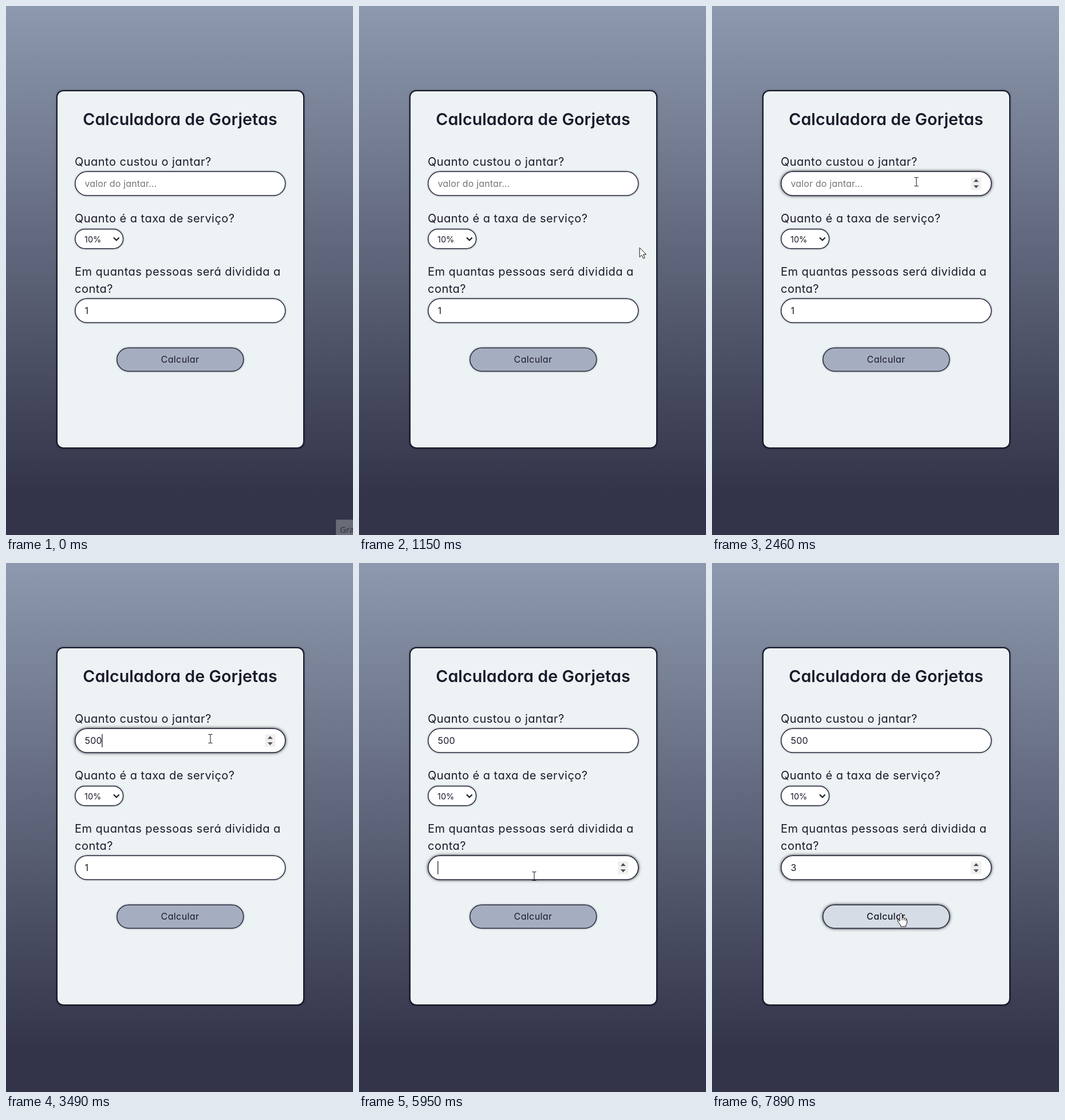
An HTML page for the animation above (8 s loop, 606 by 924 pixels).

```html
<!DOCTYPE html>
<html lang="pt-BR">
<head>
<meta charset="utf-8">
<title>Calculadora de Gorjetas</title>
<style>
  html, body { margin: 0; width: 100%; height: 100%; overflow: hidden; }
  svg {
    display: block; width: 606px; height: 924px;
    background: linear-gradient(#8d99ae, #333449 92%);
    font: 16px Inter, "Open Sans", sans-serif;
    font-feature-settings: "cv11";
    fill: #1a1a2b;
  }
  .title { font-size: 28.6px; font-weight: 600; letter-spacing: .1px; text-anchor: middle; }
  .label { font-size: 20px; letter-spacing: .48px; }
  .box { fill: #fff; stroke: #2b2d42; stroke-width: 1.5; filter: drop-shadow(0 0 1.5px #0006); }
  .glow { fill: #fff; filter: drop-shadow(0 0 3px #000c); }
  .value { letter-spacing: .15px; }
  .caret { stroke: #111; stroke-width: 1.2; }
  .spin rect { fill: #efefef; }
  .spin path { fill: #4d4d4d; }
  .cursor { fill: #fff; stroke: #111; stroke-width: 1; stroke-linejoin: round; }
</style>
</head>
<body>
<svg viewBox="0 0 606 924">
  <rect x="89" y="148" width="431" height="624" rx="11" fill="#edf2f4" stroke="#16182b" stroke-width="2"
        style="filter: drop-shadow(0 0 1.5px #0008)"/>
  <text class="title" x="304" y="208">Calculadora de Gorjetas</text>
  <g class="label">
    <text x="120" y="278.5">Quanto custou o jantar?</text>
    <text x="120" y="378">Quanto é a taxa de serviço?</text>
    <text x="120" y="471">Em quantas pessoas será dividida a</text>
    <text x="120" y="500.5">conta?</text>
  </g>

  <rect class="box" x="120.8" y="389.8" width="83.8" height="34" rx="17"/>
  <text x="137" y="412.5" font-size="14.5">10%</text>
  <path d="M188 404.5l4.8 4.8 4.8-4.8" fill="none" stroke="#1a1a2b" stroke-width="2.2"/>

  <g id="fields"></g>

  <rect class="glow" id="buttonGlow" x="193.8" y="597.3" width="221" height="40.6" rx="20.3"/>
  <rect class="box" id="button" x="193.8" y="597.3" width="221" height="40.6" rx="20.3"/>
  <text id="buttonText" x="304" y="623" text-anchor="middle" letter-spacing=".4">Calcular</text>

  <g id="tooltip">
    <rect x="576.5" y="897.5" width="40" height="40" fill="#696b76" stroke="#5c5e6b"/>
    <text x="583" y="920" font-size="15" font-family="Open Sans, sans-serif" fill="#2e3040">Gra</text>
  </g>

  <g id="cursor" class="cursor">
    <path id="arrow" d="M0 0V16.5L3.8 13 6.4 19 9.2 17.8 6.6 12H11.6Z"/>
    <path id="beam" d="M-3.5-7.5H-1L0-6.8 1-7.5H3.5M0-6.8V6.8M-3.5 7.5H-1L0 6.8 1 7.5H3.5" fill="none"/>
    <path id="hand" d="M-2 1Q-2-1 0-1T2 1V7Q4.5 5.5 5.5 7.5Q8 6.5 8.5 8.5Q10.5 8 10.5 10.5V15Q10.5 18 8.5 20V22H-.5V20L-5.5 13Q-6.5 10.5-4.5 10.5L-2 12.5ZM2 7V11M5.5 8V11M8.5 9V12"/>
  </g>
</svg>
<script>
const LOOP = 8000, BLINK = 530, STEP = 68;
const $ = id => document.getElementById(id);
const show = (el, on) => el.style.display = on ? "" : "none";
const clamp = v => Math.max(0, Math.min(1, v));
const last = (list, t) => list.filter(item => (item[0] ?? item) <= t).pop();

// time, x, y of the pointer tip
const path = [
  [590, 577, 880], [730, 591, 760], [870, 577, 642], [940, 557, 604], [1150, 490, 422],
  [1370, 382, 282], [1440, 372, 297], [1650, 357, 307], [4280, 357, 307],
  [4690, 306, 547], [7500, 306, 547], [7560, 327, 597], [7690, 330, 613], [LOOP, 330, 613]
];

const fields = [
  { y: 289.3, placeholder: "valor do jantar...", focus: [1930, 4890], ramp: 70,
    values: [[0, ""], [3060, "5"], [3340, "50"], [3490, "500"]], wakes: [1930, 3060, 3340, 3490] },
  { y: 511.3, placeholder: "", focus: [4890, LOOP], ramp: 130,
    values: [[0, "1"], [5620, ""], [6280, "3"]], wakes: [4890, 6280] }
];

for (const f of fields) {
  const frame = `x="120.8" y="${f.y}" width="367" height="41.8" rx="20.9"`;
  const g = document.createElementNS("http://www.w3.org/2000/svg", "g");
  g.innerHTML = `<rect class="glow" ${frame}/><rect class="box" ${frame}/>
    <text class="value" x="137.5" y="${f.y + 26.7}"></text>
    <path class="caret" d="M0 ${f.y + 9.5}v23"/>
    <g class="spin" transform="translate(461.3 ${f.y + 20.5})">
      <rect x="-9" y="-10.5" width="18" height="22"/>
      <path d="M-4.5-2.5L0-7.5 4.5-2.5ZM-4.5 3.5L0 8.5 4.5 3.5Z"/></g>`;
  $("fields").append(g);
  [f.glow, f.box, f.text, f.caret, f.spin] = g.children;
}

function pointer(t) {
  const i = Math.max(0, path.findLastIndex(p => p[0] <= t));
  const [t0, x0, y0] = path[i], [t1, x1, y1] = path[i + 1];
  const k = clamp(Math.floor((t - t0) / STEP) * STEP / (t1 - t0));
  return [x0 + (x1 - x0) * k, y0 + (y1 - y0) * k];
}

function drawField(f, t, y) {
  const hovered = t >= 590 && y > f.y && y < f.y + 42;
  const [on, off] = f.focus, focused = t >= on && t < off;
  const value = last(f.values, t)[1];
  f.text.textContent = value || f.placeholder;
  f.text.style.fill = value ? "" : "#72767a";
  f.glow.style.opacity = focused ? (t < on + f.ramp ? .5 : 1) : t >= off && t < off + 130 ? .5 : 0;
  show(f.spin, hovered || focused);
  show(f.caret, focused && (t - last(f.wakes, t)) % (2 * BLINK) < BLINK);
  const width = value ? f.text.getComputedTextLength() : 0;
  f.caret.setAttribute("transform", `translate(${137.8 + width} 0)`);
}

function draw() {
  const t = performance.now() % LOOP;
  const [x, y] = pointer(t);
  fields.forEach(f => drawField(f, t, y));

  const inField = fields.some(f => y > f.y && y < f.y + 42);
  const onButton = t >= 7550;
  show($("cursor"), t >= 590);
  $("cursor").setAttribute("transform", `translate(${x} ${y})`);
  show($("hand"), onButton);
  show($("beam"), inField);
  show($("arrow"), !inField && !onButton);

  const hover = t < 7620 ? 0 : t < 7690 ? .5 : 1;
  const mix = (a, b) => a + (b - a) * hover;
  $("button").style.fill = `rgb(${mix(165, 214)},${mix(174, 220)},${mix(192, 229)})`;
  $("buttonGlow").style.opacity = hover;
  $("buttonText").style.fontWeight = hover ? 500 : 400;
  show($("tooltip"), t < 70);
  requestAnimationFrame(draw);
}
draw();
</script>
</body>
</html>
```
